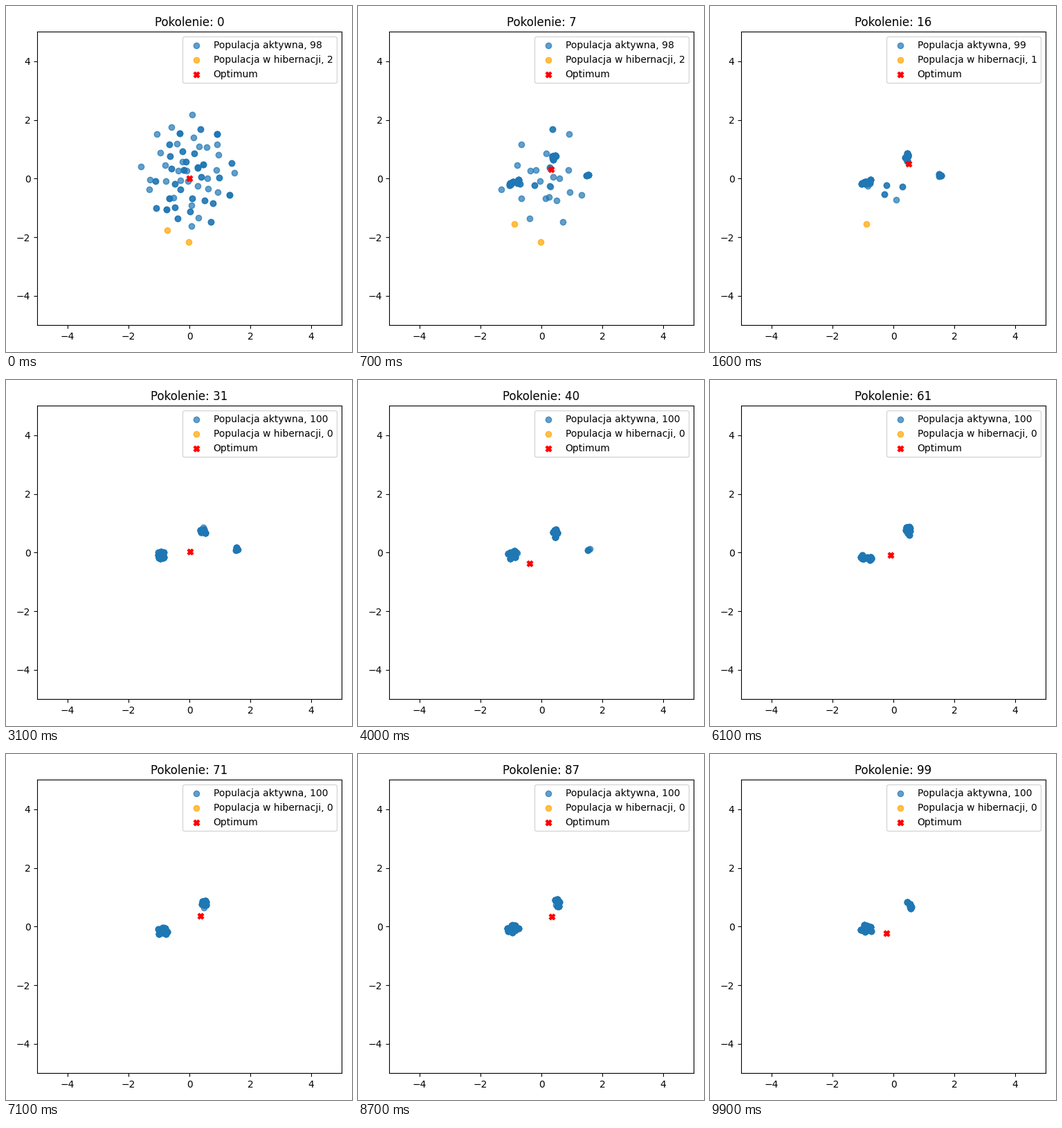
These frames come from a looping animation (500 by 500 pixels, 10 s). A matplotlib script:

```python
import numpy as np
import matplotlib.pyplot as plt
from matplotlib.animation import FuncAnimation

SIZE = 100      # population
FRAMES = 100
LIFE = 16       # generations a site survives before it moves
KEYS = [16, 31, 50, 71, 87, 99]

rng = np.random.default_rng(11)


def start_cloud(sites=60):
    """Jittered spiral of sites; the rest of the population are clones."""
    k = np.arange(sites)
    angle = k * np.pi * (3 - np.sqrt(5))
    r = ((k + 0.5) / sites) ** 0.7
    cloud = np.column_stack([1.55 * r * np.cos(angle),
                             0.15 + 1.9 * r * np.sin(angle)])
    cloud += rng.normal(0, 0.12, cloud.shape)
    return np.vstack([cloud, cloud[rng.integers(sites, size=SIZE - sites)]])


def make_niche(xs, ys, width, height, sites):
    """A few sites around a drifting centre, each renewed every LIFE generations."""
    epochs = FRAMES // LIFE + 3
    angle = rng.uniform(0, 2 * np.pi, (epochs, sites))
    radius = np.sqrt(rng.uniform(0, 1, (epochs, sites)))
    phase = rng.integers(LIFE, size=sites)

    def spot(k, gen):
        k %= sites
        epoch = (gen + phase[k]) // LIFE
        born = epoch * LIFE - phase[k]
        a, r = angle[epoch, k], radius[epoch, k]
        return (np.interp(born, KEYS, xs) + width * r * np.cos(a),
                np.interp(born, KEYS, ys) + height * r * np.sin(a))

    return spot


def steady(value):
    return [value] * len(KEYS)


left = make_niche([-0.88, -0.93, -0.92, -0.95, -0.9, -0.88],
                  [-0.14, -0.05, -0.22, -0.1, -0.06, -0.12], 0.22, 0.14, 11)
right = make_niche([0.42, 0.43, 0.47, 0.52, 0.52, 0.52],
                   [0.7, 0.7, 0.73, 0.83, 0.76, 0.63], 0.09, 0.18, 7)
far = make_niche(steady(1.53), steady(0.12), 0.06, 0.08, 4)
middle = make_niche(steady(0.03), steady(-0.5), 0.35, 0.45, 5)

# Everyone leaves the cloud early; some pass through a niche that dies out.
start = start_cloud()
leave = np.minimum(1 + rng.exponential(4, SIZE), 16)
lag = rng.integers(6, size=SIZE)
slot = rng.integers(1000, size=SIZE)
home = rng.choice([left, right], SIZE, p=[0.6, 0.4])
stop = rng.choice([None, far, middle], SIZE, p=[0.78, 0.13, 0.09])
last = {None: (0, 0), far: (36, 43), middle: (18, 29)}
move_on = np.array([rng.integers(last[s][0], last[s][1] + 1) for s in stop])

# Hibernating points: x, y, first and last generation
sleepers = [(-0.73, -1.76, 0, 4), (-0.02, -2.17, 0, 7), (-0.89, -1.55, 5, 19)]


def position(i, gen):
    if gen < leave[i]:
        return tuple(start[i])
    niche = stop[i] if gen < move_on[i] else home[i]
    return niche(slot[i], gen - lag[i])


fig, ax = plt.subplots(figsize=(5, 5), dpi=100)
active = ax.scatter([], [], alpha=0.7, color="tab:blue", label="Populacja aktywna, 100")
asleep = ax.scatter([], [], alpha=0.7, color="orange", label="Populacja w hibernacji, 0")
optimum = ax.scatter([0], [0], color="red", marker="X", label="Optimum")
ax.set_xlim(-5, 5)
ax.set_ylim(-5, 5)
title = ax.set_title("Pokolenie: 0")
labels = ax.legend(loc="upper right").get_texts()
fig.tight_layout()


def update(gen):
    resting = [(x, y) for x, y, first, end in sleepers if first <= gen <= end]
    awake = SIZE - len(resting)
    active.set_offsets([position(i, gen) for i in range(awake)])
    asleep.set_offsets(np.array(resting).reshape(-1, 2))
    best = 0.5 * np.sin(0.1 * gen)
    optimum.set_offsets([(best, best)])
    title.set_text(f"Pokolenie: {gen}")
    labels[0].set_text(f"Populacja aktywna, {awake}")
    labels[1].set_text(f"Populacja w hibernacji, {len(resting)}")
    return active, asleep, optimum, title


anim = FuncAnimation(fig, update, frames=FRAMES, interval=100, repeat=True, repeat_delay=0)
plt.show()
```
